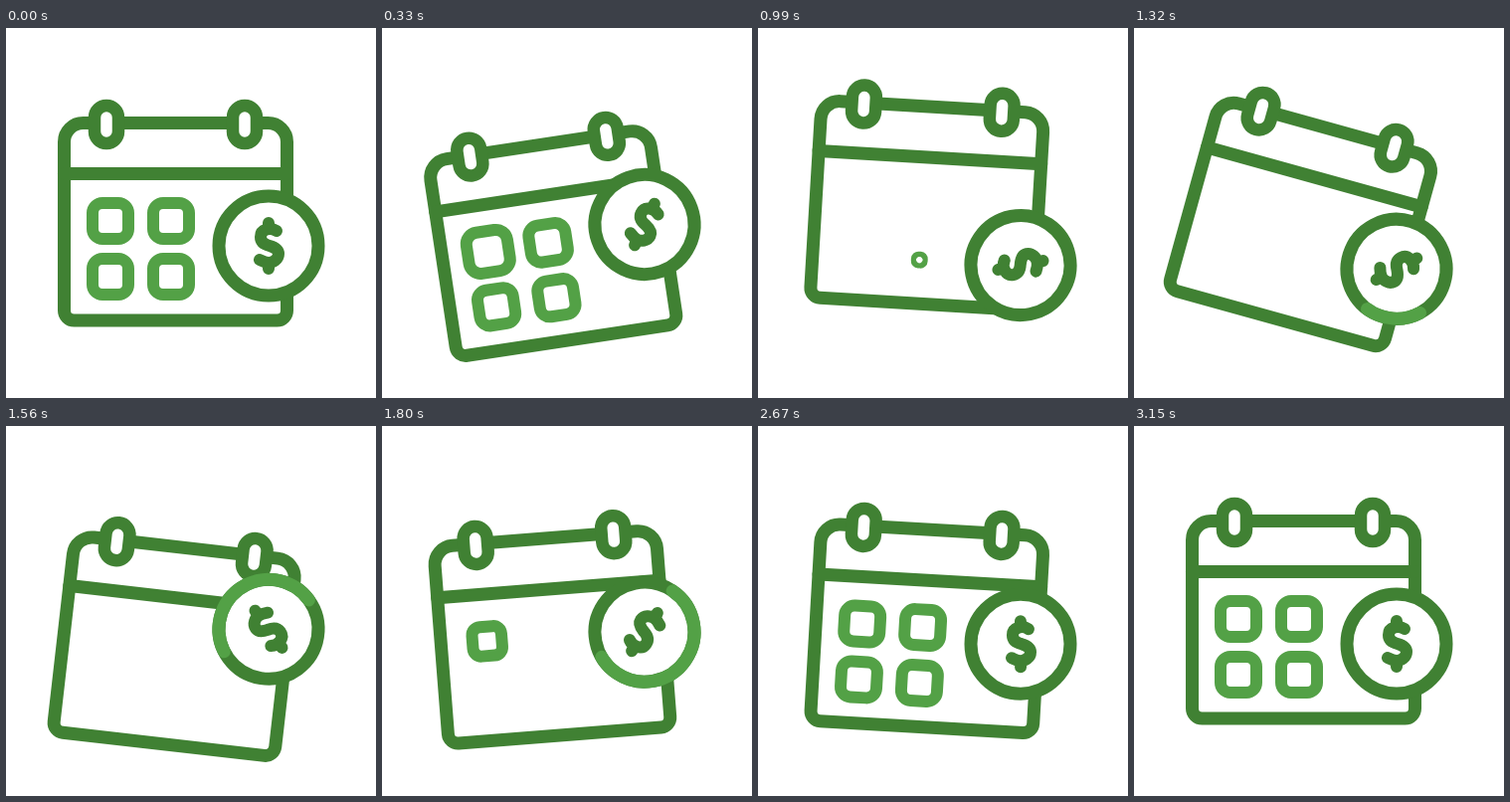
An HTML page with a canvas that plays this animation: 372x372 px, repeating every 3.6 s.

```html
<!DOCTYPE html>
<html lang="en">
<head>
<meta charset="utf-8">
<title>Payment calendar</title>
<style>
html, body { margin: 0; width: 100%; height: 100%; overflow: hidden; background: #fff; }
canvas { display: block; }
</style>
</head>
<body>
<canvas id="stage" width="372" height="372"></canvas>
<script>
const ctx = document.getElementById('stage').getContext('2d');
const LOOP = 3600, STEP = 30;
const DARK = '#408133', LIGHT = '#53a146';
const rad = deg => deg * Math.PI / 180;

// Hermite track: keys are [time, value, slope per ms (default 0)].
function track(keys, t) {
  if (t <= keys[0][0]) return keys[0][1];
  for (let i = 1; i < keys.length; i++) {
    const [t0, v0, m0 = 0] = keys[i - 1], [t1, v1, m1 = 0] = keys[i];
    if (t > t1) continue;
    const d = t1 - t0, u = (t - t0) / d, w = 1 - u;
    return v0 * w * w * (1 + 2 * u) + v1 * u * u * (3 - 2 * u)
      + d * (m0 * u * w * w - m1 * u * u * w);
  }
  return keys[keys.length - 1][1];
}

const calTilt = [[0, 0], [630, -16], [1260, 16], [1940, -7], [2530, 3.8], [3150, 0]];
const calLift = [[0, 0], [540, 32], [1060, -19], [1620, 28], [2150, -12], [2700, 9], [3150, 0]];
const coinLift = [[0, 0], [560, -34], [1180, 35], [1650, -20], [2160, 19], [2700, 0]];
const coinSpin = [[0, -360], [690, -242, .36], [1320, 62, .4], [1800, 214, .3], [2130, 302, .24], [2700, 360]];
const arcHead = [[1040, 0], [2080, 360]];
const arcTail = [[1460, 0], [2500, 360]];
const popOut = [[0, 1], [300, 1.2], [540, 0]];
const popIn = [[0, 0], [240, 1.2], [540, 1]];

function box(x, y, w, h, r, color, width) {
  ctx.beginPath();
  ctx.roundRect(x, y, w, h, r);
  ctx.fill();
  stroke(color, width);
}

function stroke(color, width, path) {
  ctx.strokeStyle = color;
  ctx.lineWidth = width;
  path ? ctx.stroke(path) : ctx.stroke();
}

function calendar(t) {
  ctx.save();
  ctx.translate(170.5, 187 + track(calLift, t));
  ctx.rotate(rad(track(calTilt, t)));
  ctx.translate(-170.5, -187);
  box(58.5, 95.5, 224, 198.5, [19, 19, 10, 10], DARK, 13);
  stroke(DARK, 13, new Path2D('M58.5 146.5H282.5'));
  for (const x of [89, 228]) box(x, 78, 24, 38, 12, DARK, 12.5);
  for (let i = 0; i < 4; i++) {
    const s = t < 1400 ? track(popOut, t - 125 - 125 * i) : track(popIn, t - 1650 - 165 * i);
    if (s < .02) continue;
    const x = 105 + 61 * (i % 2), y = 194 + 56 * (i >> 1), h = 18 * s;
    box(x - h, y - h, 2 * h, 2 * h, 10 * s, LIGHT, 12);
  }
  ctx.restore();
}

const dollar = new Path2D('M8-15C2-19-8-17-8-9C-8-3-3-1 1 0C6 1.5 10 4 10 8' +
  'C10 14 4 17 0 17C-4 17-7 15-9 14M0-23V-17M0 17V23');

function coin(t) {
  ctx.save();
  ctx.translate(264, 219 + track(coinLift, t));
  ctx.rotate(rad(track(coinSpin, t)));
  box(-50, -50, 100, 100, 50, DARK, 13);
  const tail = track(arcTail, t), head = track(arcHead, t);
  if (head > tail) {
    ctx.beginPath();
    ctx.arc(0, 0, 50, rad(tail), rad(head));
    stroke(LIGHT, 13);
  }
  stroke(DARK, 12, dollar);
  ctx.restore();
}

function draw(now) {
  const t = Math.floor(now % LOOP / STEP) * STEP;
  ctx.fillStyle = '#fff';
  ctx.fillRect(0, 0, 372, 372);
  ctx.lineCap = ctx.lineJoin = 'round';
  calendar(t);
  coin(t);
}

const start = performance.now();
function frame() {
  draw(performance.now() - start);
  requestAnimationFrame(frame);
}
frame();
</script>
</body>
</html>
```
